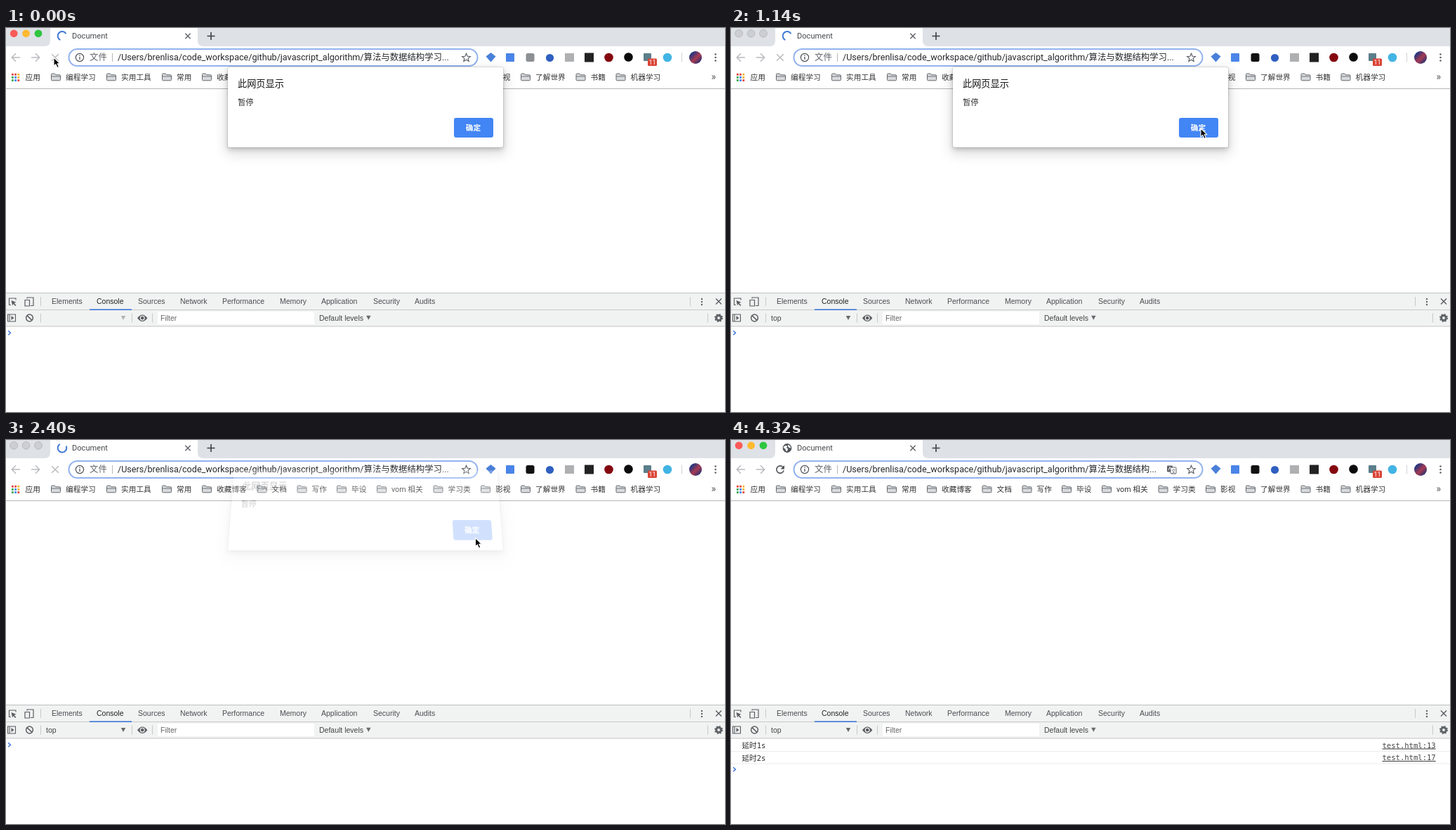
Recreate the animation shown at these times as an HTML page. Size 1024 by 547 pixels, loop 4380 ms.

```html
<!DOCTYPE html>
<html lang="zh-CN">
<head>
<meta charset="utf-8">
<title>Document</title>
<style>
html, body { margin: 0; width: 100%; height: 100%; overflow: hidden; background: #fff; }
#stage { position: absolute; left: 0; top: 0; width: 1024px; height: 547px; overflow: hidden; }
svg { position: absolute; left: 0; top: 0; display: block; }
text, #dialog { font-family: Roboto, "Noto Sans CJK SC", "Noto Sans CJK", sans-serif; }
.dev { font-family: "Liberation Sans", Arial, sans-serif; }
.mono { font-family: "DejaVu Sans Mono", "Noto Sans CJK SC", monospace; }
#dialog {
  position: absolute; left: 316px; top: 56px; width: 392px; height: 114px;
  background: #fff; border-radius: 2px; transform-origin: 50% 100%;
  box-shadow: 0 0 1.5px rgba(0,0,0,.45), 0 3px 7px rgba(0,0,0,.18), 0 7px 18px 3px rgba(0,0,0,.13);
}
#dialog svg { overflow: visible; }
</style>
</head>
<body>
<div id="stage">
  <svg id="page" width="1024" height="547"></svg>
  <div id="dialog">
    <svg width="392" height="114">
      <text x="14" y="28" font-size="13.2" fill="#111">此网页显示</text>
      <text x="14" y="53.5" font-size="11.3" fill="#333">暂停</text>
      <rect x="322" y="72" width="56" height="28" rx="3" fill="#4285f4"/>
      <text x="349.5" y="90" font-size="10.7" font-weight="700" fill="#fff" text-anchor="middle">确定</text>
    </svg>
  </div>
  <svg id="cursor" width="14" height="20">
    <path d="M1 1V13.2L3.8 10.6 6 15.4 8.4 14.4 6.2 9.8H10Z" fill="#000" stroke="#fff" stroke-width="1.1" stroke-linejoin="round"/>
  </svg>
</div>
<script>
const LOOP = 4380, STEP = 60;
const $ = id => document.getElementById(id);

const rect = (x, y, w, h, fill, more = '') =>
  `<rect x="${x}" y="${y}" width="${w}" height="${h}" fill="${fill}" ${more}/>`;
const disc = (x, y, r, fill, more = '') =>
  `<circle cx="${x}" cy="${y}" r="${r}" fill="${fill}" ${more}/>`;
const line = (d, color, width = 1) =>
  `<path d="${d}" fill="none" stroke="${color}" stroke-width="${width}"/>`;
const fill = (d, color) => `<path d="${d}" fill="${color}"/>`;
const label = (x, y, s, size, color = '#333', more = '') =>
  `<text x="${x}" y="${y}" font-size="${size}" fill="${color}" ${more}>${s}</text>`;
const group = (id, body) => `<g id="${id}">${body}</g>`;
const cross = (x, y, r, color, width) =>
  line(`M${x - r} ${y - r}l${2 * r} ${2 * r}M${x + r} ${y - r}l${-2 * r} ${2 * r}`, color, width);
const dots = (x, y, gap, r) => [-gap, 0, gap].map(d => disc(x, y + d, r, '#5f6368')).join('');
const down = (x, y, color) => fill(`M${x - 3.2} ${y - 3}h6.4l-3.2 6z`, color);

function lights(colors, edge) {
  return colors.map((c, i) => disc(11.2 + i * 17.4, 7.8, 5.4, c, edge)).join('');
}

function star(cx, cy, r) {
  let d = '';
  for (let i = 0; i < 10; i++) {
    const a = Math.PI * (i / 5 - .5), q = i % 2 ? r * .45 : r;
    d += (i ? 'L' : 'M') + (cx + q * Math.cos(a)).toFixed(2) + ' ' + (cy + q * Math.sin(a)).toFixed(2);
  }
  return line(d + 'Z', '#5f6368', 1.2);
}

function gear(cx, cy) {
  return disc(cx, cy, 3.4, 'none', 'stroke="#5f6368" stroke-width="3"') +
    disc(cx, cy, 5.1, 'none', 'stroke="#5f6368" stroke-width="1.9" stroke-dasharray="2 2.005"');
}

function tabStrip() {
  return rect(0, 0, 1024, 26, '#dee1e6') +
    fill('M55 26Q63 26 63 18V0H273V18Q273 26 281 26Z', '#fff') +
    group('lit', lights(['#fc5b57', '#fdb92f', '#2fc540'])) +
    group('dim', lights(['#cbced2', '#cbced2', '#cbced2'], 'stroke="#b1b3b7" stroke-width=".8"')) +
    `<path id="spin" fill="none" stroke="#3f78d4" stroke-width="2"/>` +
    group('globe', disc(80, 11.5, 6.4, '#50545a') +
      fill('M75.2 9.2l3-1.5 2 1.2-1.2 2 2.2 1.6-1.4 3.8-2-1.2-.4-2.6-2.6-1z', '#fff') +
      fill('M81 6.6l3.4 2.2.8 2.6-2.6-.4-1.6-2z', '#fff')) +
    label(94, 15.2, 'Document', 11.1, '#45494d') +
    cross(259, 11.5, 3.7, '#5f6368', 1.4) +
    line('M286.5 11.5h11M292 6v11', '#3c4043', 1.6);
}

function extensions() {
  return fill('M690.5 35l7 5.5-7 8-7-8z', '#4a80d9') +
    rect(712, 36, 12, 12, '#4a84e8', 'rx="1"') +
    `<rect id="ext" x="740.5" y="36" width="12" height="12" rx="2.5"/>` +
    disc(774.5, 42.5, 5.6, '#2f5fc0') +
    rect(796, 36, 13, 12, '#aeb0b2') +
    rect(824, 35.5, 13, 13, '#222') +
    disc(858.5, 42, 6.3, '#84070f') +
    disc(886.5, 41.5, 6.3, '#0b0b0b') +
    rect(908, 36, 11, 11, '#5b7f8a', 'rx="1"') +
    rect(914, 43.5, 13, 10.5, '#db4437', 'rx="1.5"') +
    label(920.5, 52.4, '11', 9, '#fff', 'text-anchor="middle"') +
    disc(942, 42, 6.3, '#42b4e4') +
    line('M962.5 35.5v13', '#d0d3d8') +
    disc(982, 42, 9, 'url(#face)') +
    dots(1010.5, 42, 4.5, 1.3);
}

function toolbar() {
  const gray = '#b9bbbe', ink = '#4f5357';
  return rect(0, 26, 1024, 60, '#fff') +
    line('M20 42H8.5M14 36.3L8.3 42l5.7 5.7', gray, 1.5) +
    line('M36 42h11.5M42 36.3l5.7 5.7-5.7 5.7', gray, 1.5) +
    group('hover', disc(70, 42, 12.5, '#eff0f2')) +
    group('stop', cross(70, 42, 4.8, ink, 1.6)) +
    group('idle', cross(70, 42, 4.8, gray, 1.5)) +
    group('reload', line('M73.8 38.4A5.2 5.2 0 1 0 75.1 43.4', ink, 1.6) + fill('M76 36v5.6h-5.6z', ink)) +
    rect(89.5, 30, 582, 24, '#fff', 'rx="12" stroke="#92b2ee" stroke-width="2"') +
    disc(105, 42, 5.6, 'none', `stroke="${ink}" stroke-width="1.2"`) +
    line('M105 41v4M105 38.3v1.5', ink, 1.3) +
    label(119, 46.4, '文件', 12.4, '#5f6368') +
    line('M151.5 36v12', '#b5b8bc') +
    label(159, 46.3, '/Users/brenlisa/code_workspace/github/javascript_algorithm/', 12.6, '#26282b') +
    group('long', label(509.5, 46.4, '算法与数据结构学习...', 12.4, '#26282b')) +
    group('short', label(509.5, 46.4, '算法与数据结构...', 12.4, '#26282b') +
      rect(621, 36.5, 8, 9, '#5f6368', 'rx="1"') +
      rect(626, 39, 8, 9, '#fff', 'rx="1" stroke="#5f6368"') +
      label(627, 46.5, '文', 6.5, '#5f6368') + line('M623 43l2-4.5 2 4.5', '#fff', .9)) +
    star(655.5, 42.5, 6.2) + extensions();
}

function bookmarks() {
  const names = [[64, '编程学习'], [143, '实用工具'], [222, '常用'], [279, '收藏博客'], [357.5, '文档'],
    [414.5, '写作'], [471, '毕设'], [528, 'vom 相关'], [608.5, '学习类'], [676, '影视'],
    [733, '了解世界'], [811.5, '书籍'], [868.5, '机器学习']];
  const hues = ['#e8453c', '#e8453c', '#f3b429', '#35a853', '#4285f4', '#f3b429', '#35a853', '#4285f4', '#e8453c'];
  const apps = hues.map((c, i) => rect(8 + i % 3 * 4.2, 64.8 + (i / 3 | 0) * 4.2, 2.8, 2.8, c)).join('');
  const folder = x =>
    `<path d="M${x + .5} 66.3q0-1.3 1.2-1.3h3.6l1.6 1.8h5.4q1.2 0 1.2 1.2v5.6q0 1.2-1.2 1.2h-10.6q-1.2 0-1.2-1.2z" fill="#d8dadd" stroke="#63676b"/>` +
    line(`M${x + 1} 69h12`, '#63676b', .9);
  return apps + label(27.5, 73.9, '应用', 10.7) +
    names.map(([x, s]) => folder(x) + label(x + 21, 73.9, s, 10.7)).join('') +
    label(1004.5, 73.5, '»', 14, '#4f5357') +
    rect(0, 86, 1024, 1, '#b3b5b7');
}

function devtools() {
  const ink = '#5a5d61', cls = 'class="dev"', size = 10.5;
  const tabs = [[65, 'Elements'], [129, 'Console'], [188, 'Sources'], [248, 'Network'], [308, 'Performance'],
    [390, 'Memory'], [449, 'Application'], [523, 'Security'], [582, 'Audits']];
  const sep = (x, y) => rect(x, y, 1, 13, '#c8c8c8');
  return rect(0, 377, 1024, 48, '#f1f2f2') +
    rect(0, 377, 1024, 1, '#bdbfc1') + rect(0, 401, 1024, 1, '#cacaca') + rect(0, 424.5, 1024, 1, '#c4c4c4') +
    line('M7 394.5H4.5V385H14v2.5', ink, 1.1) + fill('M7.5 388l7 2.8-2.8 1.2 2.8 3-1.2 1.1-2.9-3-1.2 2.5z', ink) +
    line('M30 385.5v-1.5h9v11.5h-4M27 387.5h6.5v8.5H27z', ink, 1.2) +
    sep(49, 383) +
    tabs.map(([x, s]) => label(x, 393.2, s, size, s === 'Console' ? '#222' : '#4a4d50', cls)).join('') +
    rect(119, 400.4, 60, 1.6, '#3a76d8') +
    sep(974, 383) + dots(991, 390, 4, 1.2) + cross(1015, 389.5, 4, ink, 1.4) +
    line('M2.5 408h11v10h-11zM5 408v10', ink, 1.1) + fill('M7.5 410l4 3-4 3z', ink) +
    disc(33.5, 413, 4.9, 'none', `stroke="${ink}" stroke-width="1.5"`) + line('M30 409.6l7 6.8', ink, 1.5) +
    sep(49, 406.5) +
    group('top', label(57, 416.8, 'top', size, '#444', cls) + down(167, 413, '#66696c')) +
    group('notop', down(167, 413, '#b0b2b4')) +
    sep(179, 406.5) +
    fill('M187 413.2q7.2-9.4 14.4 0q-7.2 9.4-14.4 0z', ink) +
    disc(194.2, 413.2, 2.9, ink, 'stroke="#fff" stroke-width="1.1"') +
    sep(208, 406.5) + rect(216, 404, 223, 18, '#fff') +
    label(220, 417.2, 'Filter', size, '#666', cls) +
    label(446, 416.8, 'Default levels', size, '#444', cls) + down(516.3, 412.8, '#66696c') +
    sep(999, 406.5) + gear(1015, 413);
}

function output() {
  const row = (y, s, n) => label(15.5, y, s, 10.6, '#303030', 'class="mono"') +
    label(927.5, y - .5, 'test.html:' + n, 10.55, '#444', 'class="mono" text-decoration="underline"') +
    rect(0, y + 4, 1024, 1, '#ececec');
  return group('logs', row(439, '延时1s', 13) + row(456.5, '延时2s', 17)) +
    group('prompt', line('M3.2 431.2l3.2 3-3.2 3', '#3a76d8', 1.5));
}

$('page').innerHTML =
  `<defs><linearGradient id="face" x2="1" y2="1"><stop offset=".2" stop-color="#26367f"/>` +
  `<stop offset=".55" stop-color="#a83a50"/><stop offset=".9" stop-color="#1d2f78"/></linearGradient></defs>` +
  tabStrip() + toolbar() + bookmarks() + devtools() + output();

// Rows of [time, x, y]
const cursorPath = [[0, 68, 42], [60, 69, 43], [480, 70, 43], [600, 70, 43], [660, 130, 62], [720, 270, 108],
  [780, 440, 158], [840, 590, 185], [900, 655, 180], [960, 668, 158], [1020, 669, 143], [2100, 669, 143],
  [2220, 668.5, 139.5], [2700, 668.5, 139.5], [3120, 666, 141], [3540, 666, 141], [3600, 640, 180], [3660, 570, 270],
  [3720, 490, 365], [3780, 432, 430], [3840, 422, 480], [3900, 415, 525], [3960, 410, 560], [LOOP, 410, 560]];
// Rows of [time, start angle, sweep]
const spinPath = [[0, 115, 215], [420, 250, 40], [480, 264, 8], [1140, 475, 215], [2280, 1000, 265], [2520, 1110, 265], [LOOP, 1110, 265]];

function at(rows, t) {
  const i = Math.max(1, rows.findIndex(r => r[0] >= t));
  const a = rows[i - 1], b = rows[i], k = (t - a[0]) / (b[0] - a[0]);
  return [a[1] + (b[1] - a[1]) * k, a[2] + (b[2] - a[2]) * k];
}

function arc(start, sweep) {
  const p = deg => {
    const a = deg * Math.PI / 180;
    return (80 + 6.3 * Math.cos(a)).toFixed(2) + ' ' + (11.3 + 6.3 * Math.sin(a)).toFixed(2);
  };
  return `M${p(start)}A6.3 6.3 0 ${sweep > 180 ? 1 : 0} 1 ${p(start + sweep)}`;
}

// 0 = fully open, 1 = gone
function hiddenPart(t) {
  if (t < STEP) return 0;
  const h = t < 1400 ? (600 - t) / 240 : (t - 2220) / 240;
  return Math.min(1, Math.max(0, h));
}

const show = (id, on) => { $(id).style.display = on ? '' : 'none'; };

function draw(t) {
  const loaded = t >= 2520, logged = t >= 2580;
  const modal = t >= 360 && t < 2520;
  const hot = t >= STEP && t < 600;
  show('dim', modal);
  show('lit', !modal);
  show('globe', loaded);
  show('spin', !loaded);
  show('hover', hot);
  show('stop', hot);
  show('idle', !hot && !loaded);
  show('reload', loaded);
  show('long', !loaded);
  show('short', loaded);
  show('top', t >= 240);
  show('notop', t < 240);
  show('logs', logged);
  $('prompt').setAttribute('transform', `translate(0 ${logged ? 35 : 0})`);
  $('ext').setAttribute('fill', t < 840 ? '#8c8f93' : '#111');

  const spin = $('spin');
  spin.setAttribute('d', arc(...at(spinPath, t)));
  spin.setAttribute('stroke', t >= 420 && t < 540 ? '#85898e' : '#3f78d4');

  const h = hiddenPart(t), k = h * .00055, box = $('dialog').style;
  show('dialog', h < 1);
  box.opacity = 1 - h;
  box.transform = h ? `translateY(${-17 * h}px) matrix3d(1,0,0,0, 0,${1 + 114 * k},0,${-k}, 0,0,1,0, 0,0,0,1)` : 'none';

  const [x, y] = at(cursorPath, t);
  $('cursor').style.transform = `translate(${x - 1}px, ${y - 1}px)`;
}

const start = performance.now();
function tick() {
  const t = (performance.now() - start) % LOOP;
  draw(Math.floor(t / STEP) * STEP);
  requestAnimationFrame(tick);
}
tick();
</script>
</body>
</html>
```
